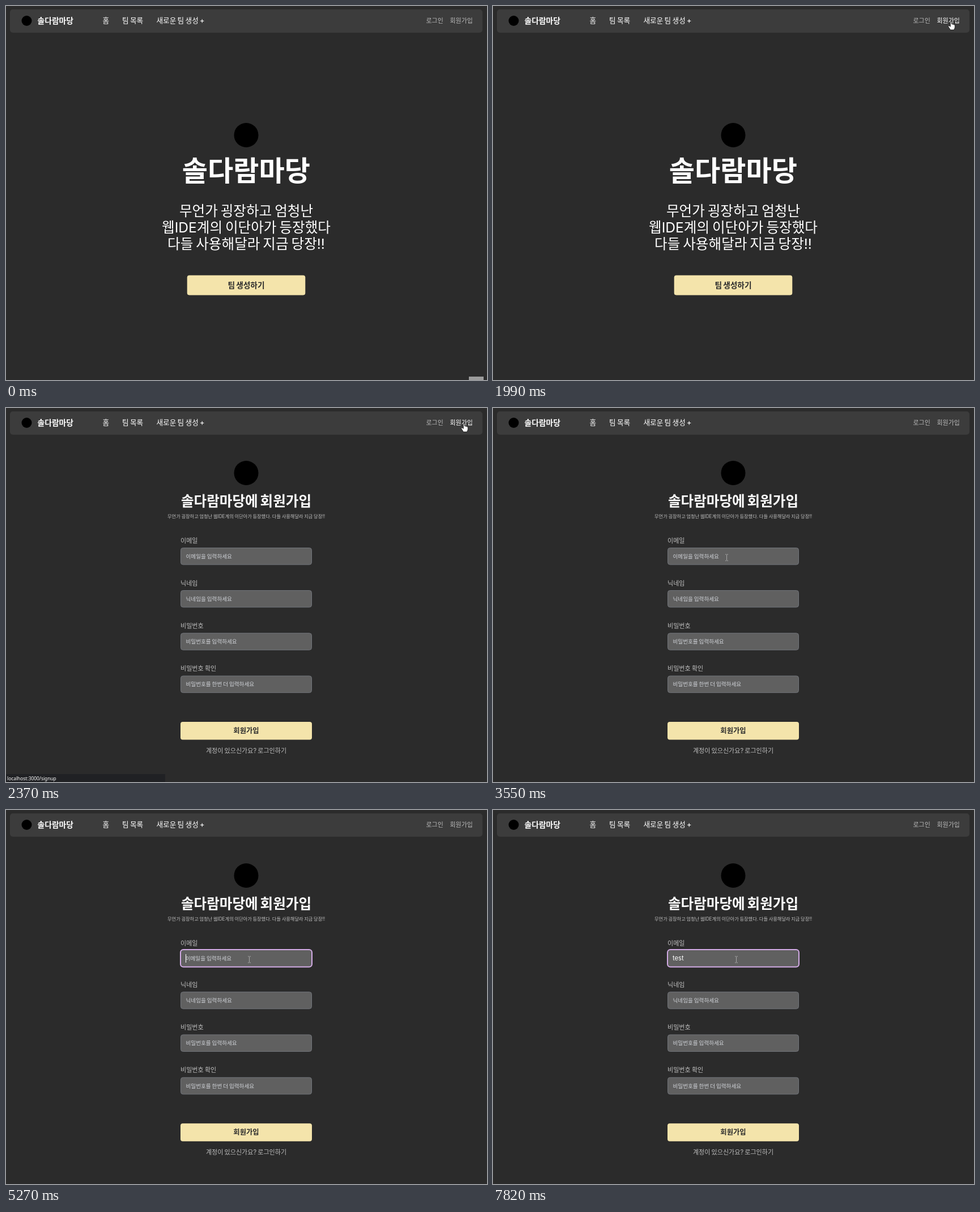
An HTML page for the animation above (8000 ms loop, 849 by 659 pixels).

```html
<!DOCTYPE html>
<html lang="ko">
<head>
<meta charset="utf-8">
<title>솔다람마당</title>
<style>
html, body { margin: 0; width: 100%; height: 100%; overflow: hidden; background: #2b2b2b; }
svg { display: block; width: 849px; height: 659px; }
text {
  font-family: Inter, "Noto Sans CJK KR", "Noto Sans CJK JP", "Noto Sans CJK", sans-serif;
  word-spacing: -.08em;
  white-space: pre;
}
</style>
</head>
<body>
<svg id="stage" viewBox="0 0 849 659" xmlns="http://www.w3.org/2000/svg"></svg>
<script>
const NS = 'http://www.w3.org/2000/svg';
const LOOP = 8000;
const BRAND = '솔다람마당';
const MID = 424;
const stage = document.getElementById('stage');

function add(parent, tag, attrs) {
  const el = document.createElementNS(NS, tag);
  for (const key in attrs) el.setAttribute(key, attrs[key]);
  parent.appendChild(el);
  return el;
}
const group = (parent = stage) => add(parent, 'g', {});
const rect = (parent, x, y, width, height, rx, fill, more = {}) =>
  add(parent, 'rect', { x, y, width, height, rx, fill, ...more });
function label(parent, str, x, y, size, fill = '#fff', weight = 400, anchor = 'start') {
  const el = add(parent, 'text', { x, y, 'font-size': size, fill, 'font-weight': weight, 'text-anchor': anchor });
  el.textContent = str;
  return el;
}
const centred = (parent, str, y, size, fill, weight) => label(parent, str, MID, y, size, fill, weight, 'middle');
const show = (el, on) => el.setAttribute('visibility', on ? 'visible' : 'hidden');
const move = (el, x, y) => el.setAttribute('transform', `translate(${x} ${y})`);

// Navigation bar
rect(stage, 7, 6, 834, 41, 5, '#3c3c3c');
add(stage, 'circle', { cx: 36.5, cy: 26, r: 9, fill: '#000' });
label(stage, BRAND, 55.5, 31, 13.8, '#fff', 700);
label(stage, '홈', 170.5, 30.4, 12.6, '#fff', 500);
label(stage, '팀 목록', 205, 30.4, 12.6, '#fff', 500);
label(stage, '새로운 팀 생성 +', 265.5, 30.4, 12.6, '#fff', 500);
label(stage, '로그인', 741.5, 30.2, 11, '#b8b8b8');
const joinLink = label(stage, '회원가입', 783.5, 30.2, 11);

// Home page
const home = group();
add(home, 'circle', { cx: MID, cy: 227.5, r: 21.5, fill: '#000' });
centred(home, BRAND, 308.2, 49.2, '#fff', 700);
['무언가 굉장하고 엄청난', '웹IDE계의 이단아가 등장했다', '다들 사용해달라 지금 당장!!']
  .forEach((line, i) => centred(home, line, 370 + i * 29, 24.6, '#fff'));
rect(home, 319.7, 474.6, 208.6, 34.8, 4, '#f4e4ab');
centred(home, '팀 생성하기', 497, 13.7, '#2b2b2b', 700);

// Sign-up page: the two halves close in by a pixel on focus
const signup = group();
const upper = group(signup);
const lower = group(signup);
add(upper, 'circle', { cx: MID, cy: 114.5, r: 21.5, fill: '#000' });
centred(upper, BRAND + '에 회원가입', 173.3, 24.6, '#fff', 700);
centred(upper, '무언가 굉장하고 엄청난 웹IDE계의 이단아가 등장했다. 다들 사용해달라 지금 당장!!', 193.6, 8.25, '#bdbdbd');
label(upper, '이메일', 308, 237.6, 11.05, '#bdbdbd');

const HINT = '#d0d3d8';
const field = (parent, y) =>
  rect(parent, 308.5, y + 0.5, 231, 29.5, 4, '#606060', { stroke: '#71747a', 'stroke-width': 1 });
[['닉네임', '닉네임을 입력하세요'], ['비밀번호', '비밀번호를 입력하세요'], ['비밀번호 확인', '비밀번호를 한번 더 입력하세요']]
  .forEach(([name, hint], i) => {
    const y = 321 + i * 75.3;
    label(lower, name, 308, y - 8.4, 11.05, '#bdbdbd');
    field(lower, y);
    label(lower, hint, 317.5, y + 18.8, 9.6, HINT);
  });
rect(lower, 308, 553, 232, 31.5, 4, '#f4e4ab');
centred(lower, '회원가입', 573.2, 12.3, '#2b2b2b', 700);
centred(lower, '계정이 있으신가요? 로그인하기', 608, 11.05, '#bdbdbd');

// Email field
field(signup, 246);
const ring = rect(signup, 308, 246, 232, 30.5, 5, '#606060', { stroke: '#d3abe6', 'stroke-width': 2 });
const emailHint = label(signup, '이메일을 입력하세요', 317.5, 264.8, 9.6, HINT);
const typed = label(signup, '', 317, 265.2, 11.2);
const caret = rect(signup, 317, 254, 1, 15, 0, '#fff');

// Address hint of the browser and the strip at the lower right
const status = group();
rect(status, 0, 645, 281, 14, 0, '#202124');
label(status, 'localhost:3000/signup', 2, 655.6, 8.4, '#fff')
  .style.fontFamily = '"Noto Sans", "Open Sans", sans-serif';
const strip = rect(stage, 817, 653, 26, 6, 0, '#9b9b9b');

// Pointers, each with its hot spot at 0,0
const pointers = { arrow: group(), hand: group(), beam: group() };
add(pointers.arrow, 'path', {
  d: 'M0 0V11.8L2.7 9.3 4.5 13.5 6.4 12.7 4.7 8.7H8.3Z', fill: '#fff', stroke: '#000', 'stroke-width': 0.7
});
add(pointers.hand, 'path', {
  d: 'M-1.2 .8Q0-.8 1.2 .8V5Q2.5 4.2 3.4 5.4 4.8 4.8 5.4 6 6.8 5.8 6.8 7.4V10.5Q6.5 13 5 15H-1.2Q-2.5 12.5-4.6 9.8-5.4 8.2-3.8 7.8-2.4 8-1.2 9.4Z',
  fill: '#fff', stroke: '#000', 'stroke-width': 0.7
});
add(pointers.beam, 'path', {
  d: 'M-2.5-5.5H-.5M.5-5.5H2.5M0-5V5M-2.5 5.5H-.5M.5 5.5H2.5', fill: 'none', stroke: '#a6a6a6', 'stroke-width': 1
});

// start, end, steps, then from, bend and to points of a curve
const moves = [
  [410, 970, 7, 835, 700, 625, 110, 785.5, 46.5],
  [970, 1280, 4, 785.5, 46.5, 784, 47, 786, 47.5],
  [1280, 1990, 9, 786, 47.5, 880, 76, 808.5, 27],
  [2967, 3550, 8, 808.5, 27, 600, 130, 412.5, 263.5],
  [4440, 4600, 2, 412.5, 263.5, 421, 263.5, 429.5, 263.5]
];
const bend = (a, b, c, u) => (1 - u) * (1 - u) * a + 2 * u * (1 - u) * b + u * u * c;
function pointerAt(t) {
  if (t < 490) return null;
  const [t0, t1, n, x0, y0, xm, ym, x1, y1] = moves.filter(m => t >= m[0]).pop();
  const u = Math.min(1, Math.floor((t - t0) / (t1 - t0) * n + 1e-6) / n);
  return [bend(x0, xm, x1, u), bend(y0, ym, y1, u)];
}

const within = (v, a, b) => v >= a && v <= b;
const stepped = (t, from, size) => Math.floor((t - from) / size + 1e-6);

// time, text, caret offset
const typing = [
  [0, '', 0], [6250, 'ㅅ', 9.7], [6780, 'ㅅㄷ', 19.4], [6930, '', 0],
  [7000, 't', 4], [7150, 'te', 10], [7225, 'tes', 15.5], [7300, 'test', 19.4]
];

function statusAlpha(t) {
  if (t < 2130 || t >= 3550) return 0;
  if (t < 2290) return 0.4 + 0.3 * stepped(t, 2130, 80);
  return t < 3331 ? 1 : 0.75 - 0.25 * stepped(t, 3331, 73);
}

function draw(t) {
  const onSignup = t >= 2370;
  const focused = t >= 4090;
  show(strip, t < 70);
  show(home, !onSignup);
  signup.setAttribute('display', onSignup ? 'inline' : 'none');
  status.setAttribute('opacity', Math.max(0, statusAlpha(t)));

  move(upper, 0, focused ? 1 : 0);
  move(lower, 0, focused ? -0.8 : 0);
  ring.setAttribute('opacity', !focused ? 0 : t < 4170 ? 0.5 : t < 4370 ? 0.85 : 1);

  const [, str, offset] = typing.filter(k => t >= k[0]).pop();
  typed.textContent = str;
  typed.setAttribute('font-size', /^ㅅ/.test(str) ? 10.6 : 11.2);
  show(emailHint, !str);
  move(emailHint, focused ? -0.8 : 0, 0);
  move(caret, offset, 0);
  show(caret, focused && !within(t, 4750, 5269.9) && !within(t, 5800, 6249.9) && t < 7820);

  const pos = pointerAt(t);
  let kind = '';
  if (pos) {
    const [x, y] = pos;
    const overLink = within(x, 783, 825) && within(y, 19, 34);
    const overField = onSignup && within(x, 308, 540) && within(y, 246, 276);
    kind = overLink ? 'hand' : overField ? 'beam' : 'arrow';
    move(pointers[kind], x, y);
  }
  for (const k in pointers) show(pointers[k], k === kind);
  joinLink.setAttribute('fill', kind === 'hand' ? '#fff' : '#b8b8b8');
}

let start = null;
function tick(now) {
  if (start === null) start = now;
  draw((now - start) % LOOP);
  requestAnimationFrame(tick);
}
draw(0);
requestAnimationFrame(tick);
</script>
</body>
</html>
```
